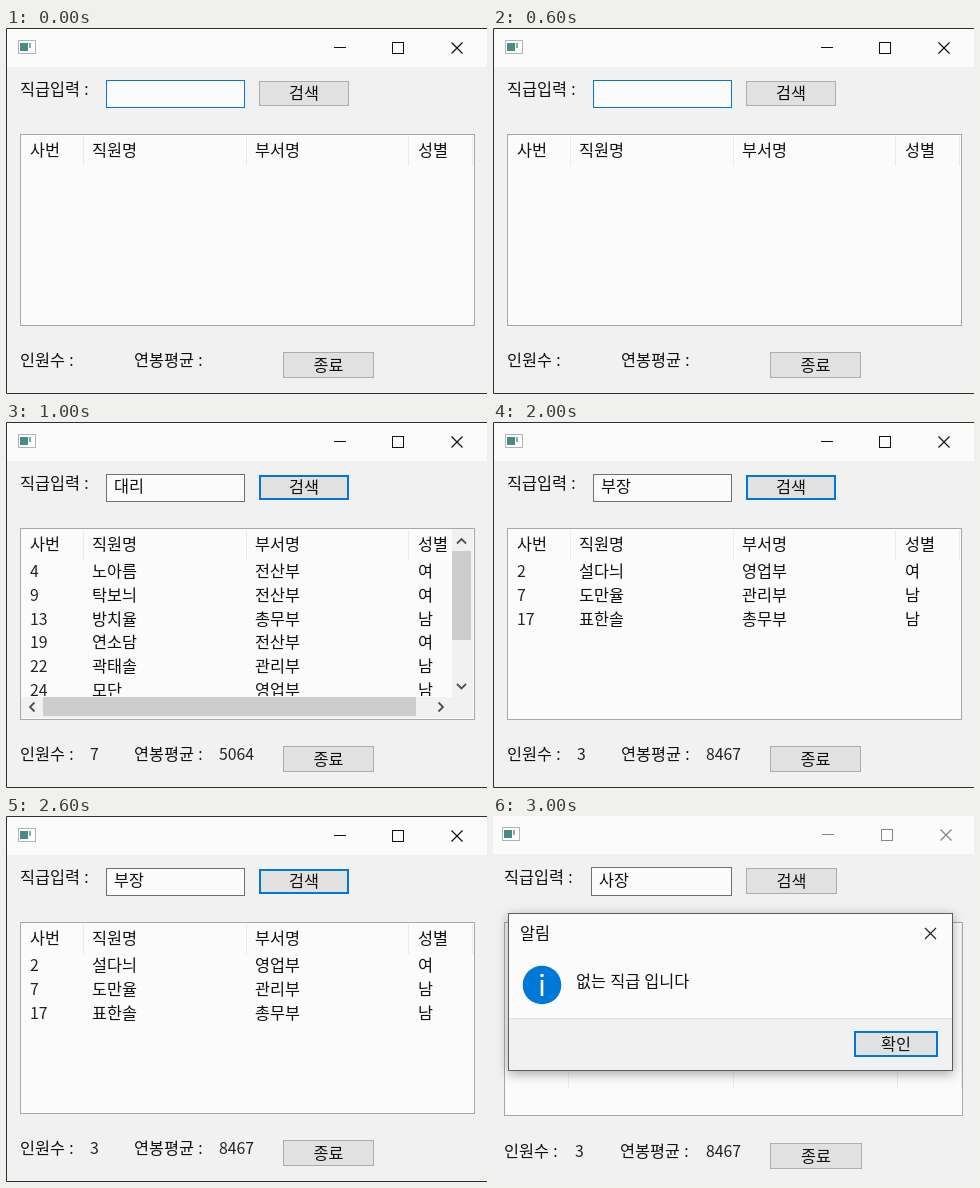
Write an HTML page that moves like this. It is 481 by 366 pixels and loops after 4 s.

```html
<!DOCTYPE html>
<html lang="ko">
<head>
<meta charset="utf-8">
<style>
  html, body { margin: 0; width: 100%; height: 100%; overflow: hidden; }
  svg { display: block; width: 481px; height: 366px; background: #f1f1f1; }
  text { font: 16.3px "Open Sans", "Noto Sans CJK KR", "Noto Sans CJK", sans-serif; fill: #111; white-space: pre; }
  .num { font: 15.8px "Noto Sans CJK KR", "Noto Sans CJK", sans-serif; fill: #222; }
</style>
</head>
<body>
<svg id="stage" viewBox="0 0 481 366"></svg>
<script>
const BLUE = '#0078d7', PAPER = '#fbfbfb', FACE = '#f1f1f1';
const stage = document.getElementById('stage');
const separators = [77, 240, 402, 466];
const columns = [24, 86, 249, 412];
const headings = ['사번', '직원명', '부서명', '성별'];

const scenes = [
  { query: '', rows: [], count: '', pay: '' },
  { query: '대리', count: 7, pay: 5064, focus: true, scroll: true, rows: [
    [4, '노아름', '전산부', '여'], [9, '탁보늬', '전산부', '여'],
    [13, '방치율', '총무부', '남'], [19, '연소담', '전산부', '여'],
    [22, '곽태솔', '관리부', '남'], [24, '모단', '영업부', '남']] },
  { query: '부장', count: 3, pay: 8467, focus: true, rows: [
    [2, '설다늬', '영업부', '여'], [7, '도만율', '관리부', '남'],
    [17, '표한솔', '총무부', '남']] },
  { query: '사장', rows: [], count: 3, pay: 8467, alert: true }
];

const box = (x1, y1, x2, y2, fill, line, w = 1) =>
  `<rect x="${x1 + w / 2}" y="${y1 + w / 2}" width="${x2 - x1 - w}" height="${y2 - y1 - w}" fill="${fill}" stroke="${line}" stroke-width="${w}"/>`;
const fillBox = (x1, y1, x2, y2, fill) =>
  `<rect x="${x1}" y="${y1}" width="${x2 - x1}" height="${y2 - y1}" fill="${fill}"/>`;
const path = (d, color, w = 1) =>
  `<path d="${d}" fill="none" stroke="${color}" stroke-width="${w}"/>`;
const text = (x, y, s, anchor = 'start') =>
  `<text x="${x}" y="${y}" text-anchor="${anchor}"${typeof s === 'number' ? ' class="num"' : ''}>${s}</text>`;
const button = (x1, y1, x2, y2, label, focus) =>
  box(x1, y1, x2, y2, '#e1e1e1', focus ? BLUE : '#adadad', focus ? 2 : 1) +
  text((x1 + x2) / 2, (y1 + y2) / 2 + 5.5, label, 'middle');
const cross = (x, y, color) =>
  path(`M${x - 5.5} ${y - 5.5}l11 11m0-11l-11 11`, color, 1.2);

function scrollbars() {
  const arrow = d => path(d, '#505050', 1.8);
  return fillBox(446, 107, 467, 296, FACE) + fillBox(15, 275, 446, 296, FACE) +
    fillBox(446, 129, 465, 218, '#cdcdcd') + fillBox(37, 275, 410, 294, '#cdcdcd') +
    arrow('M451 121.5l4.5-4.5 4.5 4.5') + arrow('M451 262l4.5 4.5 4.5-4.5') +
    arrow('M28.5 280.5l-4.5 4.5 4.5 4.5') + arrow('M432.5 280.5l4.5 4.5-4.5 4.5');
}

function dialog() {
  return '<g style="filter:drop-shadow(0 3px 6px #0005)">' +
    box(15, 97, 460, 255, PAPER, '#5c5c5c') + '</g>' +
    fillBox(16, 203, 459, 254, FACE) + fillBox(16, 202, 459, 203, '#dfdfdf') +
    text(27, 123, '알림') + cross(437.5, 117.5, '#222') +
    `<circle cx="49" cy="169" r="19.3" fill="${BLUE}"/>` +
    fillBox(47.7, 164, 50.3, 180, '#fff') + '<circle cx="49" cy="159.5" r="1.8" fill="#fff"/>' +
    text(83, 171, '없는 직급 입니다') +
    button(361, 215, 445, 241, '확인', true);
}

function draw(s) {
  const off = s.alert;
  // The inactive window is drawn slightly larger.
  const X = x => off ? Math.round(x * 1.0115 - 2.9) : x;
  const Y = y => off ? Math.round(y * 1.0125 - 1.3) : y;
  const label = (x, y, str) => text(X(x), Y(y), str);
  const ink = off ? '#858585' : '#111';
  const ix = X(12), iy = Y(12);

  let out = fillBox(0, 0, 481, Y(39), PAPER) +
    box(ix, iy, ix + 18, iy + 14, '#fff', '#b0b4b6') +
    fillBox(ix + 2, iy + 3, ix + 10, iy + 11, '#4b8a84') +
    fillBox(ix + 11, iy + 3, ix + 13, iy + 8, '#7fb0a8') +
    path(`M${X(328)} ${Y(19) + .5}h12`, ink) +
    box(X(386), Y(14), X(386) + 12, Y(14) + 12, 'none', ink) +
    cross(X(451), Y(20), ink);

  out += label(14, 67, '직급입력 :') +
    box(X(100), Y(52), X(239), Y(80), PAPER, s.query ? '#707070' : BLUE) +
    label(108, 70, s.query) +
    button(X(253), Y(53), X(343), Y(78), '검색', s.focus);

  out += box(X(14), Y(106), off ? 470 : 469, Y(298), PAPER, '#a8a8a8');
  for (const x of separators)
    out += fillBox(X(x), Y(108), X(x) + 1, off ? 272 : 138, '#ebebeb');
  headings.forEach((str, i) => out += label(columns[i], 128, str));

  out += '<clipPath id="view"><rect x="15" y="107" width="452" height="167"/></clipPath><g clip-path="url(#view)">';
  s.rows.forEach((row, r) => row.forEach((cell, i) =>
    out += text(columns[i], 155 + r * 23.8, cell)));
  out += '</g>';
  if (s.scroll) out += scrollbars();

  out += label(14, 338, '인원수 :') + label(84, 338, s.count) +
    label(128, 338, '연봉평균 :') + label(213, 338, s.pay) +
    button(X(277), Y(324), X(368), Y(350), '종료');
  return out + (off ? dialog() : path('M481 .5H.5V365.5H481', '#303030'));
}

const start = performance.now();
let shown = -1;
function tick() {
  const index = Math.floor((performance.now() - start) % 4000 / 1000);
  if (index !== shown) {
    shown = index;
    stage.innerHTML = draw(scenes[index]);
  }
  requestAnimationFrame(tick);
}
tick();
</script>
</body>
</html>
```
